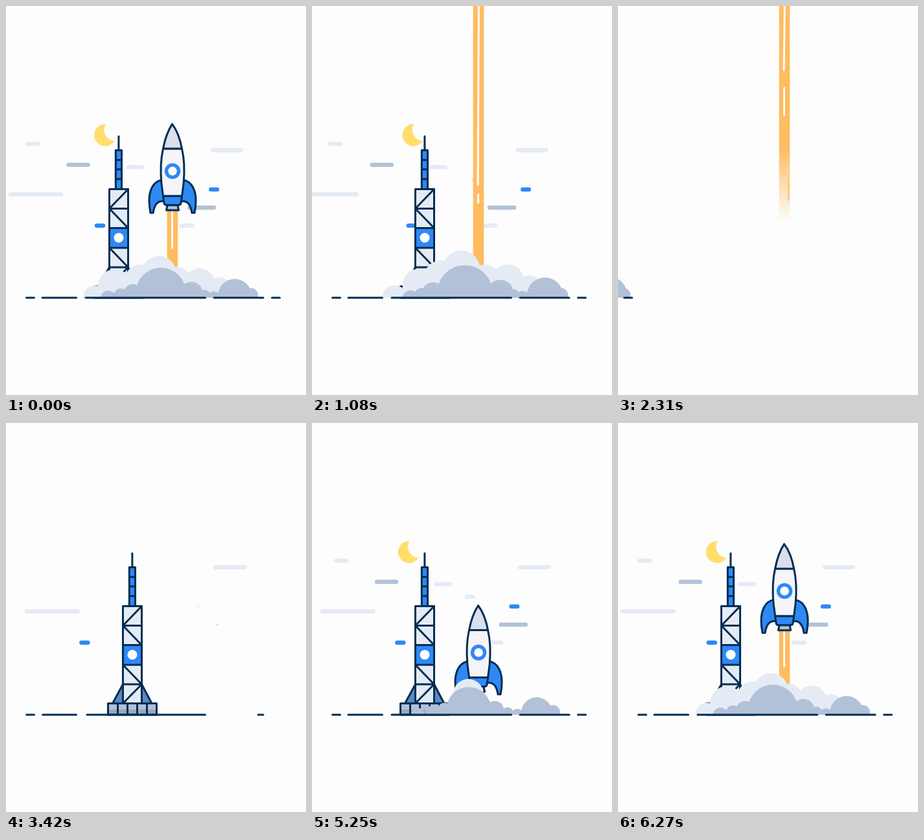
An HTML page with a canvas for the animation above (6.3 s loop, 463 by 600 pixels).

```html
<!DOCTYPE html>
<html>
<head>
<meta charset="utf-8">
<style>
html, body { margin: 0; width: 100%; height: 100%; overflow: hidden; background: #fdfdfd; }
canvas { display: block; }
</style>
</head>
<body>
<canvas id="stage" width="463" height="600"></canvas>
<script>
const ctx = document.getElementById('stage').getContext('2d');
const LOOP = 6.3;
const PAPER = '#fdfdfd', NAVY = '#022d52', BLUE = '#2e89f5', PALE = '#e5ebf4', GREY = '#b2c1d7';

const clamp = v => Math.min(1, Math.max(0, v));
const progress = (t, start, length) => clamp((t - start) / length);
const easeOut = (p, power) => 1 - (1 - p) ** power;
const backOut = p => 1 + 2.7 * (p - 1) ** 3 + 1.7 * (p - 1) ** 2;
const pop = (t, start, length = 0.3) => t <= start ? 0 : backOut(progress(t, start, length));
// Accelerating slide to the left at the end of the loop
const scroll = (t, start) => 1388 * Math.max(0, t - LOOP - start) ** 3;

function shape(d, fill, outlined = true) {
  const path = new Path2D(d);
  if (fill) { ctx.fillStyle = fill; ctx.fill(path); }
  if (outlined) { ctx.strokeStyle = NAVY; ctx.lineWidth = 3; ctx.stroke(path); }
}
function line(x1, y1, x2, y2, color, width) {
  ctx.strokeStyle = color;
  ctx.lineWidth = width;
  ctx.beginPath();
  ctx.moveTo(x1, y1);
  ctx.lineTo(x2, y2);
  ctx.stroke();
}
function disc(x, y, r, color) {
  ctx.fillStyle = color;
  ctx.beginPath();
  ctx.arc(x, y, Math.max(0, r), 0, 7);
  ctx.fill();
}
function shifted(x, y, draw) {
  ctx.save();
  ctx.translate(x, y);
  draw();
  ctx.restore();
}

// centre x at lift-off, y, width, drift per second, colour, appearance time
const streaks = [
  [41.5, 212.5, 23, -3.6, PALE, 3.65],
  [341, 222.5, 50, -1.7, PALE, 3.16],
  [111.5, 245, 36.5, -3.4, GREY, 3.72],
  [199, 248.5, 27, -3.2, PALE, 3.6],
  [248.8, 268, 15.5, 5, PALE, 3.55],
  [321, 283, 16, 8.3, BLUE, 3.414],
  [46, 290.5, 85, -8.8, PALE, 3.11],
  [302, 311, 44.5, -8.3, GREY, 3.412],
  [145, 338.7, 16.5, 8.2, BLUE, 3.11],
  [279, 338.7, 23, -4.5, PALE, 3.5]
];
function drawSky(t) {
  const age = t - LOOP;
  for (const [x, y, w, drift, color, start] of streaks) {
    const k = pop(t, start), half = (w - 6.6) / 2;
    if (!k) continue;
    shifted(x + drift * age - scroll(t, 0.9 + 0.002 * Math.max(0, x - w / 2)), y, () => {
      ctx.scale(k, k);
      line(-half, 0, half, 0, color, 6.6);
    });
  }
  const k = pop(t, 3.76);
  shifted(153 + 3.1 * age - scroll(t, 1.18), 199, () => {
    ctx.scale(k, k);
    shape('M1-17A17 17 0 1 0 14.500 9A17 17 0 0 1 1-17Z', '#ffde6b', false);
  });
}

function drawTower(t) {
  const arrive = 340 * (1 - easeOut(progress(t, 3.12, 0.6), 4));
  if (t < 3.12) return;
  shifted(arrive - scroll(t, 1.65), 0, () => {
    shape('M159.500 403L143.500 432.500H159.500ZM188.500 403L204 432.500H188.500Z', '#5b88c8');
    shape('M136.500 432.500H211.500V450H136.500Z', '#b2c1d7', false);
    shape('M136.500 442H211.500V450H136.500Z', '#98a8bf', false);
    shape('M136.500 432.500H211.500V450H136.500ZM151.500 433V449M166.500 433V449M181.500 433V449M196.500 433V449');
    shape('M159.500 282.500H188.500V432.500H159.500Z', PALE);
    shape('M159.500 342.500H188.500V373H159.500Z', BLUE);
    shape('M188.500 282.500L159.500 312.500H188.500M159.500 312.500L188.500 342.500M159.500 373L188.500 403H159.500M188.500 403L159.500 432.500');
    shape('M169.300 222.500H178.500V282.500H169.300ZM169.300 237.500H178.500M169.300 252H178.500M169.300 267H178.500M173.900 222V201', BLUE);
    disc(174, 357.5, 7.5, '#fff');
  });
}

function liftAt(t) {
  const age = Math.max(0, t - 4.47);
  return 24.5 * (Math.exp(age) - 1) + 300 * Math.max(0, t - 6.96) ** 2;
}

function drawFlame(t, top) {
  const age = t - LOOP;
  const leave = 1329 * Math.max(0, age - 1.9) ** 2.2;
  ctx.save();
  ctx.beginPath();
  ctx.rect(248, 0, 18, 450);
  ctx.clip();
  const fade = ctx.createLinearGradient(0, 407 - leave, 0, 520 - leave);
  fade.addColorStop(0, 'rgba(255,188,96,1)');
  fade.addColorStop(1, 'rgba(255,188,96,0)');
  ctx.fillStyle = fade;
  ctx.fillRect(248.6, top, 16.6, Math.max(0, 520 - leave - top));
  line(263.5, 449 - leave, 263.5, 487 - leave, '#ffca80', 3);
  if (t > 5) {
    const drop = 0.35 * leave;
    const tail = 373 - 90 * age - drop;
    if (tail > top) line(t > 7 ? 257.5 : 256.5, top, t > 7 ? 256 : 256.5, tail, PAPER, 3);
    const from = 377 - 80 * age - drop, to = 364 - 56 * age - drop;
    if (to > from) line(256.5, from, 256.5, to, PAPER, 3);
  }
  ctx.restore();
}

function drawRocket(t) {
  if (t < 3.42) return;
  const lift = liftAt(t);
  const arrive = 260 * (1 - easeOut(progress(t, 3.42, 0.5), 4));
  shifted(arrive, 0, () => drawFlame(t, Math.max(-20, 443 - lift)));
  shifted(arrive + 257, 310.5 - lift, () => {
    for (const side of [-1, 1]) {
      ctx.save();
      ctx.scale(side, 1);
      shape('M17 86C31 89 36 104 36 118C36 126 35 132 34 137H30C28 126 25 118 13 119Z', BLUE);
      ctx.restore();
    }
    shape('M-8 125H8L9.500 133H-9.500Z', GREY);
    shape('M-14.500 111H14.500L13 122Q12.500 125 9 125H-9Q-12.500 125-13 122Z', BLUE);
    shape('M-14.500 38H14.500C18 53 19 71 17 92L14.500 111H-14.500L-17 92C-19 71-18 53-14.500 38Z', '#f4f4f9');
    shape('M-0.500 0C7 10 12 24 14.500 38H-14.500C-12 24-7 10-0.500 0Z', '#d9dfeb');
    disc(0, 72.5, 12.2, BLUE);
    disc(0, 72.5, 6.8, '#fff');
  });
}

// x, y, r at lift-off, then their change per second, then appearance time and length
const paleSmoke = [
  [137, 449, 18, -9, 0, 0.3, 5.7, 0.68],
  [168, 432, 26, -2, -1, 0, 5.5, 0.6],
  [207, 421, 22.5, -8, -3, 2.5, 5.4, 0.6],
  [236, 412, 26.5, -5, -6, 2, 4.85, 0.5],
  [263, 424, 22, 3, -2, 1, 5.3, 0.6],
  [299, 427, 22.5, 3, -4, 1.5, 5.4, 0.6],
  [329, 436, 17.5, 6, -1, 2, 5.5, 0.6]
];
const greySmoke = [
  [158, 451, 12, -5, 1, 1.5, 4.65, 0.45],
  [177, 446, 10.5, -7, 0, 0.7, 4.6, 0.45],
  [196, 443.5, 14.5, -8.5, 0, 2.5, 4.55, 0.45],
  [239, 442, 38.5, -2.8, 0.5, 4, 4.47, 0.5],
  [286, 443, 17.5, 4, 0, 3, 4.55, 0.45],
  [306, 447, 9.5, 4, 0, 0.7, 4.6, 0.45],
  [321, 449, 9, 4, 0, 0.7, 4.65, 0.45],
  [353, 447, 26, 6, 0, 2, 4.55, 0.45],
  [378, 446, 11, 5.8, 0, 0, 4.6, 0.45]
];
function drawSmoke(t, puffs, color) {
  const age = t - LOOP;
  ctx.save();
  ctx.beginPath();
  ctx.rect(0, 0, 463, 450);
  ctx.clip();
  ctx.translate(-scroll(t, 1.66), 0);
  for (const [x, y, r, vx, vy, vr, start, length] of puffs) {
    const k = easeOut(progress(t, start, length), 2);
    if (k) disc(x + vx * age, y + vy * age, (r + vr * age) * k, color);
  }
  ctx.restore();
}

// left, right, start
const ground = [[31.5, 43.5, 3.12], [56, 108.5, 3.12], [123, 307.5, 3.12], [321, 397, 3.405], [410.5, 422.5, 3.45]];
function drawGround(t) {
  const shift = scroll(t, 1.65);
  for (const [left, right, start] of ground) {
    const k = easeOut(progress(t, start, 0.35), 2.3);
    if (k) line(right - (right - left) * k - shift, 450, right - shift, 450, NAVY, 3);
  }
}

function render(now) {
  let t = now / 1000 % LOOP;
  if (t < 2.7) t += LOOP;
  ctx.fillStyle = PAPER;
  ctx.fillRect(0, 0, 463, 600);
  drawSky(t);
  drawTower(t);
  drawRocket(t);
  drawSmoke(t, paleSmoke, PALE);
  drawSmoke(t, greySmoke, GREY);
  drawGround(t);
}

ctx.lineCap = ctx.lineJoin = 'round';
const began = performance.now();
function tick() {
  render(performance.now() - began);
  requestAnimationFrame(tick);
}
tick();
</script>
</body>
</html>
```
